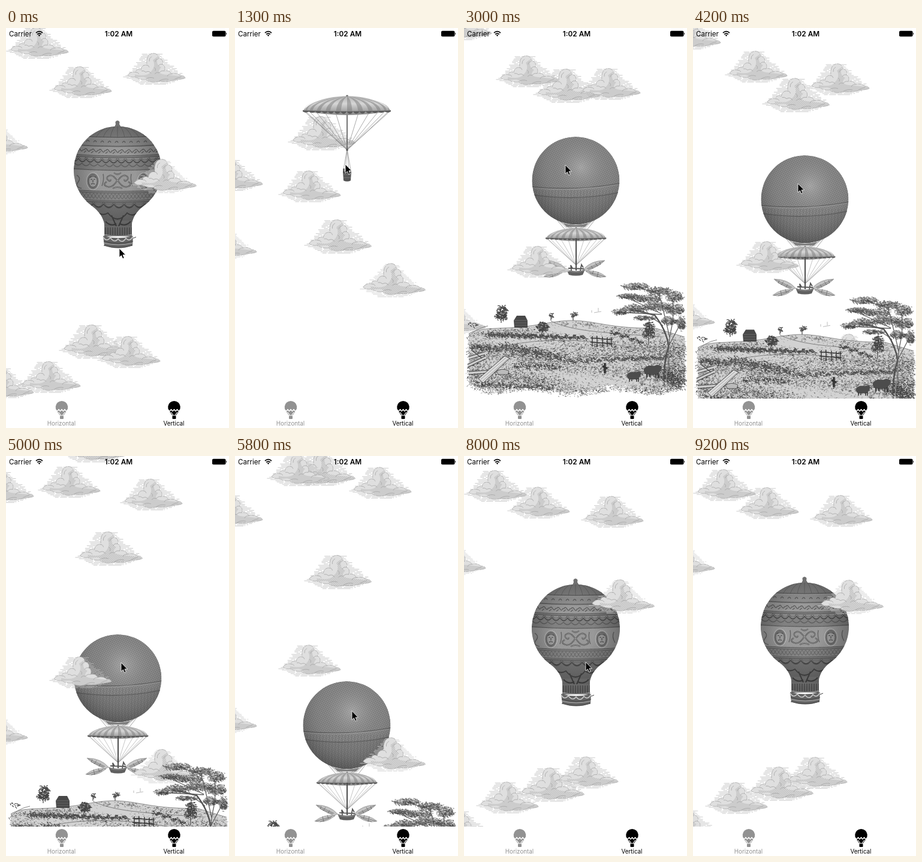
Write an HTML page that moves like this. It is 372 by 666 pixels and loops after 10000 ms.

```html
<!DOCTYPE html>
<html lang="en">
<head>
<meta charset="utf-8">
<title>Balloons</title>
<style>
html, body { margin: 0; width: 100%; height: 100%; overflow: hidden; background: #fff; }
svg { display: block; width: 372px; height: 666px; font-family: Inter, Roboto, sans-serif; }
</style>
</head>
<body>
<svg id="stage" viewBox="0 0 372 666"></svg>
<script>
const LOOP = 10000, STEP = 100, PAGE = 617;
let seed = 77;
const rnd = (a = 0, b = 1) => {
  seed = seed * 16807 % 2147483647;
  return a + (b - a) * seed / 2147483647;
};
const n1 = v => v.toFixed(1);
const range = (n, fn) => Array.from({ length: n }, (_, i) => fn(i)).join('');
const ink = (d, color, w = 0.7, extra = '') =>
  `<path d="${d}" fill="none" stroke="${color}" stroke-width="${w}" ${extra}/>`;
const fill = (d, color, extra = '') => `<path d="${d}" fill="${color}" ${extra}/>`;

// Clouds: [x, y when scroll is 0, width, 1 = light halo]
const farClouds = [[0, 20, 108], [195, 63, 108], [88, 515, 117], [-58, 587, 108], [115, 687, 117]];
const nearClouds = [[72, 50, 108], [-68, 144, 108, 1], [205, 204, 117, 1], [152, 499, 109],
  [20, 541, 108], [53, -267, 108], [190, -246, 108]];

const CLOUD = 'M8 39C12 34 17 33 21 34C22 29 27 28 30 31C30 25 35 21 40 22C39 13 41 5 48 3C56 1 60 7 59 11' +
  'C65 11 68 16 66 21C70 23 71 28 69 32C75 30 80 34 81 37C88 35 93 37 96 40C101 40 104 42 104 44' +
  'C98 46 92 46 86 47C76 50 67 49 60 49C52 52 42 50 38 46C30 47 24 44 20 42C14 43 10 41 8 39Z';

function haloLines(grow) {
  let d = '';
  for (let y = 4; y < 55; y += 2) {
    const half = (y < 42 ? 11 + 38 * Math.pow(y / 42, 1.3) : 49 - (y - 42) * 2.2) + grow;
    const mid = 49 + y * 0.09;
    let x = Math.max(0, mid - half + rnd(0, 7));
    const end = Math.min(108, mid + half - rnd(0, 7));
    while (x < end) {
      const len = Math.min(rnd(6, 24), end - x);
      d += `M${n1(x)} ${y}h${n1(len)}`;
      x += len + rnd(1, 3);
    }
  }
  return d;
}

function cloudArt(id, grow, tone) {
  return `<g id="${id}">${ink(haloLines(grow), tone, 0.75)}
    ${fill(CLOUD, '#dfdfdf')}
    <g clip-path="url(#cloudClip)">
    ${fill('M58 8Q54 22 64 26Q54 36 70 38L108 42V54H40Q46 44 34 42L20 43V38Q40 42 46 34Q56 24 50 14Z', 'url(#haze)')}</g>
    ${ink(CLOUD, '#a9a9a9', 0.75, 'stroke-dasharray="9 1.500 5 1"')}
    ${ink('M39 22q4 0 5 4M31 32q4-1 7 2q6-3 9 2M59 12q-5 1-5 5M66 21q-5-1-7 3M69 32q-6-1-8 3q-5-2-8 2M81 37q-6 0-7 4M21 34q4 0 6 3M48 8q-5 3-4 8M52 26q4 2 2 6M38 46q6-5 14-2M60 49q8-5 16-3M86 46q5-3 11-4', '#a3a3a3', 0.75)}
  </g>`;
}
const place = ([x, y, w, light]) =>
  `<use href="#${light ? 'cloudB' : 'cloudA'}" transform="translate(${x} ${y}) scale(${n1(w / 10.8) / 10})"/>`;

// Ornament helpers for the round balloon
const band = (y, h, color) =>
  fill(`M110 ${y}Q186 ${y + 6} 263 ${y}v${h}Q186 ${y + h + 6} 110 ${y + h}Z`, color);
const bow = (x, y) => y + 3 * (1 - Math.pow((x - 186.5) / 76, 2));
const swags = (x0, x1, y, w, depth) => range(Math.ceil((x1 - x0) / w), i => {
  const x = x0 + i * w;
  return `M${n1(x)} ${n1(bow(x, y))}q${w / 2} ${depth * 2} ${w} 0`;
});
const curve = y => `M110 ${y}Q186 ${y + 6} 263 ${y}`;
const medal = x => `<g transform="translate(${x} 302)">
  <ellipse rx="10.5" ry="14" fill="#777" stroke="#b9b9b9" stroke-width="1.6"/>
  <ellipse rx="7" ry="10" fill="#a6a6a6" stroke="#555" stroke-width=".8"/>
  ${ink('M-4-3h3M1-3h3M0-2v4M-3 5q3-2 6 0M-5-6q5-4 10 0', '#444', 1.1)}</g>`;

function roundBalloon() {
  const body = 'M186.5 210.500A73.300 73.300 0 0 1 230 343Q211 357 210 375V394H164V375Q162 357 143 343A73.300 73.300 0 0 1 186.500 210.500Z';
  const scroll = 'M186 302q-8-12-14-9t-2 7t5-1M186 302q8-12 14-9t2 7t-5-1M186 300q-8 14-17 11t-1-8M186 300q8 14 17 11t1-8M180 288q6 5 12 0M178 314q8-4 16 0';
  let figures = '';
  for (let x = 118; x < 258; x += 12)
    figures += `M${x} ${n1(bow(x, 249))}q3-5 6 0t5-1M${x + 4} ${n1(bow(x, 235))}q3-5 5 0M${x} ${n1(bow(x, 253))}l4-3`;
  return `<clipPath id="bodyClip"><path d="${body}"/></clipPath>
    ${fill('M181 212L183 207Q181 202 186 201Q191 202 189 207L192 212Z', '#707070')}
    <g clip-path="url(#bodyClip)">
    ${fill(body, '#868686')}
    ${band(227, 13, '#979797')}${band(243, 14, '#a0a0a0')}${band(282, 33, '#a0a0a0')}
    ${band(318, 12, '#8a8a8a')}${band(333, 32, '#7a7a7a')}
    ${ink(range(13, i => `M186 206Q${n1(186 + (i - 6) * 9)} 213 ${n1(186 + (i - 6) * 12)} 229`), '#606060')}
    ${ink(figures, '#606060', 1.4)}
    ${ink([226, 241, 257, 260, 281, 316, 319, 331, 334].map(curve).join(''), '#565656', 0.9)}
    ${ink([228, 243, 262, 315, 330].map(curve).join(''), '#b2b2b2', 0.6)}
    ${ink(swags(108, 264, 262, 13, 6), '#515151', 3.2)}
    ${ink(swags(108, 264, 262, 13, 5), '#b0b0b0', 0.9)}
    ${ink(swags(114, 264, 271, 13, 4), '#626262', 1.4)}
    ${ink(range(26, i => `M${110 + i * 6} ${n1(bow(110 + i * 6, 320))}l6 9m0-9l-6 9`), '#5c5c5c', 0.7)}
    ${ink(swags(112, 264, 336, 17, 7), '#505050', 3.2)}
    ${ink(swags(112, 264, 336, 17, 5), '#a0a0a0', 0.8)}
    ${ink(scroll, '#555', 2.2)}${ink(scroll, '#c0c0c0', 0.6)}
    ${medal(145)}${medal(230)}
    ${ink('M118 292q8 5 2 12t6 10M160 310q4-10 2-20M211 310q-4-10-2-20M250 290q-4 8 2 18', '#666', 1.4)}
    ${ink('M150 352q10 9 20 3q16 20 32 0q10 8 20-3M176 359l8 18M196 359l-8 18M166 369q8 9 18 4M208 369q-8 9-18 4', '#484848', 2)}
    ${fill('M164 377H211V394H164Z', '#929292')}
    ${ink(range(12, i => `M${166 + i * 4} 379v13`), '#555', 1.2)}
    ${fill(body, 'url(#hatch)', 'opacity=".3"')}${fill(body, 'url(#shade)')}</g>
    ${fill('M162 393Q187 400 212 393L211 409Q187 418 164 409Z', '#636363')}
    ${ink('M162 395q6 9 12 1q7 10 13 2q7 9 13-1q6 7 12-3', '#c6c6c6', 1.6)}
    ${ink('M163 405Q187 411 212 405M164 391Q187 396 211 391', '#b0b0b0', 1)}
    ${ink('M163 409Q187 416 211 409M212 397l5-2M163 402q25 7 49 0', '#444', 1)}`;
}

// Canopy with its cords, drawn around x = 187
function canopy() {
  const dome = 'M113 415C127 399 155 390.500 187 390.500C219 390.500 246 399 260 415Q187 429 113 415Z';
  const cordX = i => 187 + 72 * Math.sin((i - 6) * Math.PI / 12);
  const edge = x => 420 - 5 * Math.pow((x - 187) / 73, 2);
  return `<g id="canopy">
    ${ink(range(13, i => `M${n1(cordX(i))} ${n1(edge(cordX(i)))}L187 480`), '#858585', 0.7)}
    ${ink('M187 418V481', '#555', 1.5)}
    <circle cx="187" cy="390.5" r="2" fill="#666"/>
    ${fill(dome, 'url(#silk)')}
    ${range(12, i => {
      const a = cordX(i), b = cordX(i + 0.45);
      return fill(`M187 391Q${n1(a)} 397 ${n1(a)} ${n1(edge(a))}L${n1(b)} ${n1(edge(b))}Q${n1(b)} 397 187 391Z`, '#7c7c7c', 'opacity=".5"');
    })}
    ${fill(`M113 414Q187 417 260 414L260 416${range(14, i => `q-5.25 ${n1(3 + 5 * Math.sin((i + 0.5) / 14 * Math.PI))} -10.5 0`)}Z`, '#5a5a5a')}
    ${ink('M114 414Q187 417 259 414', '#999', 0.6)}</g>`;
}

function parachute() {
  return `<use href="#canopy"/>
    ${ink('M187 478L180.500 516M187 478L193.500 516M187 478L184 516M187 478L190 516', '#999', 0.8)}
    <circle cx="187" cy="480" r="1.8" fill="#555"/>
    ${fill('M180 516H194L193 531Q187 534 181 531Z', '#555')}
    ${ink('M181 521h12M181 526h12', '#888')}
    ${ink('M181.500 518V511', '#444', 2.2)}`;
}

function meshBalloon() {
  const ball = 'M186.500 181A73 73 0 1 1 186.400 181Z';
  const feathers = 'M199 402Q212 387 235 387Q228 395 205 405ZM203 405Q222 402 237 414Q220 418 206 407Z';
  const wings = fill(feathers, '#c4c4c4') + ink(feathers, '#888', 0.7) +
    ink('M205 401L233 388M207 402L228 393M208 406L235 414M210 408L228 415M212 396l3 5M219 391l4 6M226 389l2 5M216 404l-2 6M224 406l-2 9', '#666', 0.8);
  const ribs = range(30, i => `M${n1(110 + i * 5.3)} 330q-3-10 0-60`);
  return `<clipPath id="ballClip"><path d="${ball}"/></clipPath>
    ${fill('M152 316L170 333H203L221 316Z', '#ddd')}
    ${ink('M152 316L168 335M221 316L206 335M160 322L178 334M213 322L196 334M170 326L187 338L204 326', '#999', 0.9)}
    <g clip-path="url(#ballClip)">
    ${fill(ball, '#8e8e8e')}
    ${fill('M110 275Q187 288 263 271V335H110Z', '#848484')}
    ${fill(ball, 'url(#net)')}
    ${ink(ribs, '#626262', 0.6)}
    ${ink('M110 264Q187 272 263 258M110 277Q187 290 263 273', '#505050', 1.1)}
    ${ink('M110 266Q187 274 263 260', '#aaa', 0.6)}
    ${fill(ball, 'url(#ballShade)')}</g>
    ${fill('M166 325Q187 331 207 325L202 331H171Z', '#808080')}
    <use href="#canopy" transform="translate(187 332) scale(.69) translate(-187 -389)"/>
    ${ink('M187 350V404', '#4a4a4a', 2)}
    ${wings}<g transform="translate(370 0) scale(-1 1)">${wings}</g>
    ${fill('M171 402Q187 408 202 402L198 411Q187 414 175 411Z', '#606060')}
    ${ink('M179 404l-1-9l3 5M194 404l2-10l3 5M174 400l26 1', '#555', 1.8)}
    ${ink('M172 404Q187 409 201 404', '#aaa', 0.7)}`;
}

// Engraved countryside
const hill = x => 500 - 13 * Math.exp(-Math.pow((x - 180) / 65, 2)) +
  16 * Math.exp(-x / 14) + Math.max(0, x - 320) * 0.3;
const foot = x => 607 + 5 * Math.sin(x / 23) - Math.pow((x - 190) / 70, 4) * 0.25;
const near = (x, y, cx, cy, rx, ry) => Math.exp(-Math.pow((x - cx) / rx, 2) - Math.pow((y - cy) / ry, 2));
const tick = (x, y, len, a) => `M${n1(x)} ${n1(y)}l${n1(len * Math.cos(a))} ${n1(len * Math.sin(a))}`;
const leaves = (x, y, rx, ry, n) => range(n, () => {
  const a = rnd(0, 6.283), r = Math.sqrt(rnd()) * rnd(0.85, 1.15);
  return tick(x + rx * r * Math.cos(a), y + ry * r * Math.sin(a), rnd(1.5, 3.5), rnd(-0.4, 1.3));
});

// Darkness of the engraving: slanted furrows with a few dark and pale fields
function tone(x, y) {
  return 0.5 + 0.2 * Math.sin((y - 0.12 * x) / 6 + Math.sin(x / 45)) +
    0.4 * near(x, y, 120, 541, 70, 13) + 0.55 * near(x, y, 345, 575, 45, 35) +
    0.35 * near(x, y, 80, 590, 80, 12) + 0.3 * near(x, y, 250, 548, 90, 7) +
    0.3 * near(x, y, 20, 545, 25, 35) - 0.45 * near(x, y, 185, 503, 50, 9) -
    0.3 * near(x, y, 130, 525, 80, 7) - 0.2 * near(x, y, 215, 590, 60, 14);
}

function countryside() {
  const sod = (n, dark, len) => range(n, () => {
    const x = rnd(3, 370), top = hill(x);
    const y = top + (foot(x) - top) * rnd() + rnd(0, 4);
    const side = Math.min(1, (x - 1) / 14, (372 - x) / 8);
    return rnd() < (tone(x, y) - dark) * side
      ? tick(x, y, rnd(0.8, len), 0.2 * Math.sin(x / 60 + y / 20) + rnd(-0.5, 0.5)) : '';
  });
  const hedge = (x0, y0, x1, y1, r, n) => range(n, i => {
    const k = i / n;
    return leaves(x0 + (x1 - x0) * k, y0 + (y1 - y0) * k + 2 * Math.sin(i * 1.7), r * 1.3, r, 12);
  });
  const crown = [[285, 430, 23, 6], [325, 438, 24, 7], [351, 447, 14, 9], [272, 446, 18, 5], [304, 450, 28, 6],
    [259, 472, 13, 5], [284, 467, 24, 7], [321, 463, 26, 8], [350, 468, 17, 10], [300, 482, 18, 4],
    [361, 491, 8, 12], [341, 487, 15, 7]];
  let ridge = '', base = '';
  for (let x = 8; x <= 370; x += 3) {
    ridge += `${ridge ? 'L' : 'M'}${x} ${n1(hill(x))}`;
    base = `L${x} ${n1(foot(x) - rnd(0, 9))}${base}`;
  }
  const cow = (x, y, s) => `<g transform="translate(${x} ${y}) scale(${s})">
    ${fill('M-12-2Q-8-8 2-6Q9-9 12-4L10 1L6 6H-8Q-13 4-12-2Z', '#4c4c4c')}
    ${ink('M-8 5v5M-4 5v4M4 5v5M7 4v6', '#333', 1.5)}</g>`;
  return `${fill(ridge + base + 'Z', '#d2d2d2')}${ink(ridge, '#777', 0.8)}
    ${ink(sod(6500, -0.1, 3), '#a0a0a0', 0.8)}
    ${ink(sod(9000, 0.1, 3), '#606060', 0.8)}
    ${ink(sod(6500, 0.32, 2.6), '#363636', 0.9)}
    ${ink('M40 496Q18 500 5 517M145 488Q166 498 200 503T330 514M60 531Q170 505 320 540M170 552Q250 535 350 556', '#777', 0.9)}
    ${ink(leaves(62, 472, 9, 11, 150) + leaves(62, 480, 11, 6, 90) + leaves(182, 476, 6, 4, 30) +
      leaves(145, 478, 4, 4, 20) + leaves(130, 498, 10, 8, 170) + leaves(308, 499, 9, 11, 140) +
      leaves(308, 510, 11, 7, 80) + leaves(14, 494, 8, 5, 20), '#444', 1.1)}
    ${ink('M62 475V491M182 476V487M145 480V487M130 500V514M308 500V527', '#444', 1.2)}
    ${ink('M213 470v4M224 466v6M217 474l12-2', '#aaa', 0.8)}
    ${ink(hedge(38, 510, 120, 513, 3, 30) + hedge(120, 513, 205, 515, 2.6, 24) + hedge(245, 506, 300, 524, 2, 14), '#484848', 1)}
    ${ink(hedge(62, 528, 172, 551, 7, 32) + hedge(175, 554, 345, 548, 3, 30) + hedge(12, 530, 62, 534, 4, 14), '#484848', 1)}
    ${ink(hedge(85, 561, 160, 565, 5, 16) + hedge(330, 575, 362, 593, 9, 24) + hedge(20, 592, 150, 600, 4, 22), '#404040', 1)}
    ${fill('M83 487L88 479H102L106 487V499H84Z', '#484848')}
    ${ink('M84 487H106M85 491h20M85 495h20', '#777', 0.7)}
    ${ink('M211 516L248 519M211 523L248 526M214 513v17M222 513v18M231 514v17M239 515v16M246 515v16', '#353535', 1.4)}
    ${ink('M8 549L35 541M6 562L36 548M8 574L52 571M12 538l18 14', '#ccc', 4)}
    ${ink('M8 547L35 539M6 560L36 546M8 572L52 569M12 536l18 14M8 552L35 544M6 565L36 551M8 577L52 574', '#444', 1.2)}
    ${fill('M24 584L68 546L76 550L32 591Z', '#dcdcdc', 'stroke="#444" stroke-width="1"')}
    ${ink('M28 585L70 549M31 588L73 551', '#888')}
    ${fill('M54 572q9-7 21-1l-2 6H58Z', '#bbb', 'stroke="#555"')}
    ${ink('M235 558V575M231 563l8 4', '#333', 3.4)}
    ${cow(284, 579, 1)}${cow(315, 570, 1.25)}
    ${crown.map(([x, y, rx, ry]) => `<ellipse cx="${x}" cy="${y}" rx="${rx * 0.85}" ry="${ry * 0.75}" fill="#aaa" opacity=".7"/>`).join('')}
    ${ink('M333 588Q334 555 341 530Q339 505 318 478L285 470', '#505050', 2.4)}
    ${ink('M345 584Q337 548 345 505Q351 480 348 450M341 530Q354 506 362 490M332 496Q315 480 300 481M343 515Q333 470 325 442L290 432M330 476L270 448M330 477L255 473', '#606060', 1.3)}
    ${ink('M337 590Q339 555 344 533', '#999', 1)}
    ${ink(crown.map(c => leaves(...c, Math.round(c[2] * c[3]))).join(''), '#636363', 0.9)}
    ${ink(crown.map(c => leaves(c[0] + 2, c[1] + 2, c[2] * 0.8, c[3] * 0.6, 45)).join(''), '#444', 0.9)}`;
}

const tabIcon = (x, color) => `<g transform="translate(${x} 631)" fill="${color}">
  <path d="M-8.500 6A10.300 10.300 0 1 1 8.500 6L3.500 13.500H-3.500Z"/>
  <path d="M-11 4L-7.500 7L-5 4L-2.500 7L0 4L2.500 7L5 4L7.500 7L11 4" fill="none" stroke="#fff" stroke-width="1.300"/>
  <path d="M-5.500 8.500L-1.700 13.500M5.500 8.500L1.700 13.500" stroke="#fff" stroke-width="1.200"/>
  <rect x="-3" y="14.500" width="6" height="5.500" rx="1"/></g>`;
const label = (x, y, size, text, extra = '') =>
  `<text x="${x}" y="${y}" font-size="${size}" ${extra}>${text}</text>`;

const stage = document.getElementById('stage');
stage.innerHTML = `<defs>
  <clipPath id="view"><rect width="372" height="617"/></clipPath>
  <clipPath id="cloudClip"><path d="${CLOUD}"/></clipPath>
  <pattern id="haze" width="2" height="2" patternUnits="userSpaceOnUse" patternTransform="rotate(45)">
    <path d="M0 1h2" stroke="#b0b0b0" stroke-width=".8"/></pattern>
  <pattern id="hatch" width="2.200" height="2.200" patternUnits="userSpaceOnUse" patternTransform="rotate(-20)">
    <path d="M0 1h2.200" stroke="#444" stroke-width=".6"/></pattern>
  <pattern id="net" width="3" height="3" patternUnits="userSpaceOnUse" patternTransform="rotate(28)">
    <path d="M0 1.500h3M1.500 0v3" stroke="#606060" stroke-width=".5"/></pattern>
  <radialGradient id="shade" cx=".48" cy=".42" r=".55">
    <stop offset=".4" stop-opacity="0"/><stop offset="1" stop-opacity=".3"/></radialGradient>
  <radialGradient id="ballShade" cx=".56" cy=".35" r=".68">
    <stop offset="0" stop-color="#fff" stop-opacity=".28"/><stop offset=".45" stop-color="#999" stop-opacity=".1"/>
    <stop offset="1" stop-color="#222" stop-opacity=".42"/></radialGradient>
  <linearGradient id="silk" x2="0" y2="1"><stop stop-color="#b2b2b2"/><stop offset=".4" stop-color="#d6d6d6"/>
    <stop offset="1" stop-color="#888"/></linearGradient>
  ${cloudArt('cloudA', 5, '#bdbdbd')}${cloudArt('cloudB', 1, '#cdcdcd')}${canopy()}
  </defs>
  <rect width="372" height="666" fill="#fff"/>
  <g clip-path="url(#view)">
    <g id="far">${farClouds.map(place).join('')}</g>
    <g id="first">${roundBalloon()}</g>
    <g id="second">${parachute()}</g>
    <g id="third">${meshBalloon()}</g>
    <g id="near">${nearClouds.map(place).join('')}</g>
    <g id="land">${countryside()}</g>
  </g>
  ${label(5, 13.5, 11.6, 'Carrier')}
  ${label(188, 13.5, 11.8, '1:02 AM', 'text-anchor="middle" font-weight="600"')}
  ${ink('M50 8.200Q55.500 3.200 61 8.200M52.200 10.500Q55.500 7.600 58.800 10.500', '#000', 1.7)}
  ${fill('M55.500 14L53.700 12Q55.500 10.500 57.300 12Z', '#000')}
  <rect x="344" y="4.800" width="22.500" height="9.400" rx="2" fill="#000"/>
  <path d="M367.200 7.500q2 2 0 4Z"/>
  ${tabIcon(93, '#929292')}${tabIcon(280.5, '#000')}
  ${label(92.5, 662, 9.8, 'Horizontal', 'text-anchor="middle" fill="#929292"')}
  ${label(280, 662, 9.8, 'Vertical', 'text-anchor="middle"')}
  <path id="cursor" d="M0 0V14.800L3.400 11.700L5.800 17L8.200 16L6 10.800H10.500Z" stroke="#fff" stroke-width=".8"/>`;

// Keys are [time, value, ...]
const scrollKeys = [[0, 47], [300, 240], [500, 430], [800, 600], [1000, 622], [1100, 640], [1300, 741], [1800, 860],
  [2200, 995], [2500, 1180], [2700, 1236], [3000, 1243], [3400, 1234], [3800, 1234], [4200, 1212], [5000, 1127],
  [5700, 1060], [6000, 1020], [6100, 985], [6300, 760], [6500, 622], [6600, 600], [6800, 464], [7200, 330],
  [7500, 120], [7700, 12], [7900, -4], [8000, -3], [8400, 0], [LOOP, 0]];
const cursorKeys = [[0, 189, 367], [400, 186, 215], [900, 184, 345], [1050, 184, 348], [1300, 184, 227],
  [1800, 176, 110], [2200, 170, 150], [2700, 169, 228], [3000, 169, 228], [3400, 169, 237], [3800, 169, 237],
  [4200, 175, 259], [5000, 192, 344], [5700, 195, 411], [6000, 195, 445], [6500, 190, 40], [6600, 190, 47],
  [6800, 187, 183], [7200, 198, 320], [7500, 203, 343], [9000, 203, 343], [9100, 139, 173], [LOOP, 139, 173]];

// Monotone cubic through the keys
function track(keys, t, c = 1) {
  const rate = j => (keys[j + 1][c] - keys[j][c]) / (keys[j + 1][0] - keys[j][0]);
  const slope = j => {
    if (j === 0) return rate(0);
    if (j === keys.length - 1) return 0;
    const a = rate(j - 1), b = rate(j);
    return a * b > 0 ? 2 * a * b / (a + b) : 0;
  };
  let i = 0;
  while (i < keys.length - 2 && keys[i + 1][0] <= t) i++;
  const [a, b] = [keys[i], keys[i + 1]];
  const h = b[0] - a[0], u = (t - a[0]) / h, v = 1 - u;
  return a[c] * v * v * (1 + 2 * u) + b[c] * u * u * (3 - 2 * u) +
    h * u * v * (v * slope(i) - u * slope(i + 1));
}

const part = {};
for (const id of ['far', 'near', 'first', 'second', 'third', 'land', 'cursor']) part[id] = document.getElementById(id);
const move = (id, x, y) => part[id].setAttribute('transform', `translate(${x.toFixed(2)} ${y.toFixed(2)})`);

function draw(t) {
  const s = track(scrollKeys, t);
  move('far', 0, -s / 2);
  move('near', 0, s / 4);
  move('first', 0, -s);
  move('second', 0, PAGE - 153 - s);
  move('third', 0, PAGE * 2 + 9 - s);
  move('land', 0, 0.75 * (PAGE * 2 + 9 - s));
  move('cursor', track(cursorKeys, t, 1), track(cursorKeys, t, 2));
  part.cursor.setAttribute('visibility', t < 9200 ? 'visible' : 'hidden');
}

const start = performance.now();
let shown = -1;
function frame() {
  const t = Math.floor((performance.now() - start) % LOOP / STEP) * STEP;
  if (t !== shown) draw(shown = t);
  requestAnimationFrame(frame);
}
frame();
</script>
</body>
</html>
```
